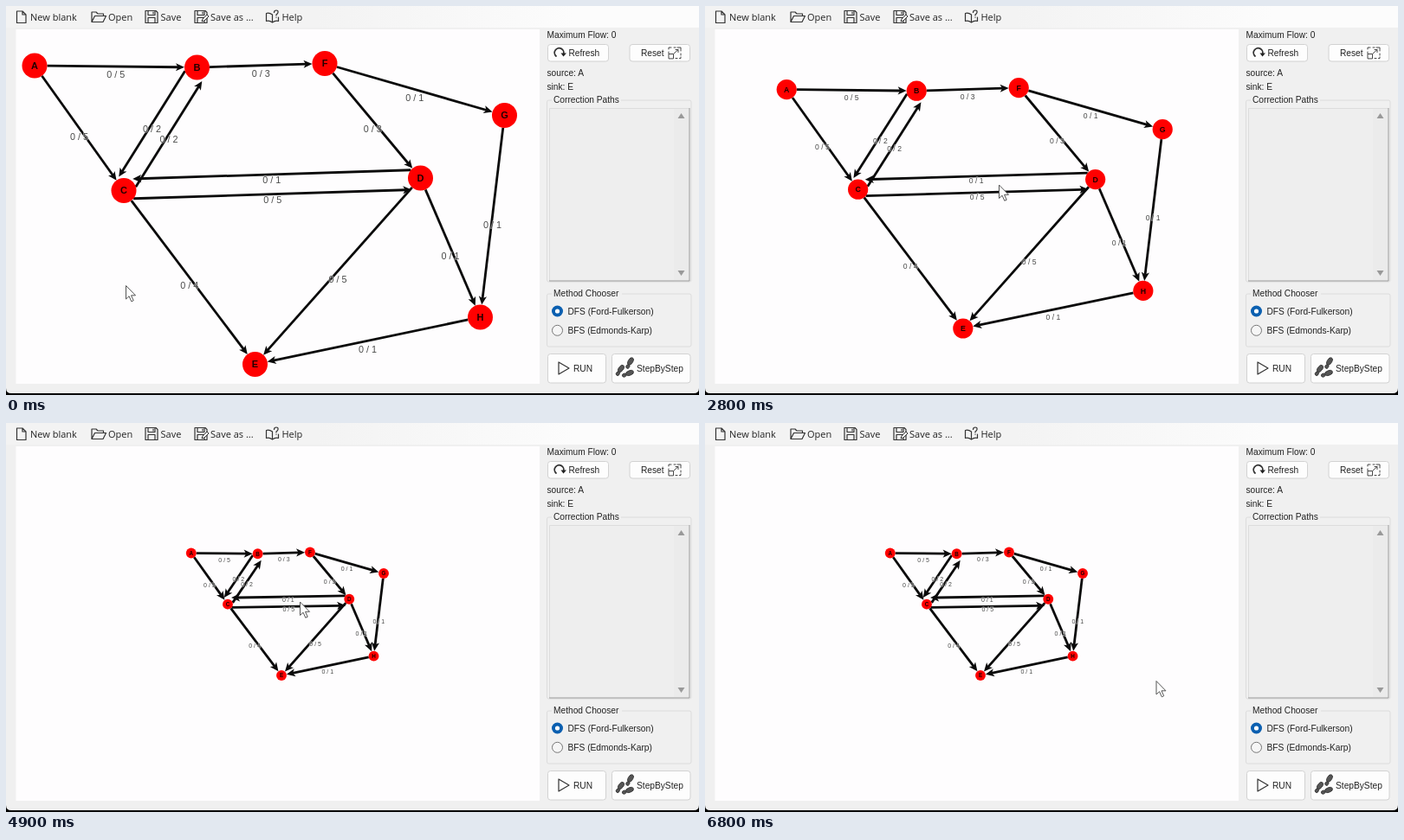
Animation of 800x450 px, one loop 8750 ms. Source, as an HTML page:

```html
<!DOCTYPE html>
<html lang="en">
<head>
<meta charset="utf-8">
<title>Maximum flow editor</title>
<style>
  html, body { margin: 0; width: 100%; height: 100%; overflow: hidden; background: #000; }
  svg { display: block; width: 100vw; height: 100vh; }
  text { font-family: "Liberation Sans", Arial, sans-serif; font-size: 10.2px; fill: #222; }
  .menu text { font-family: "Open Sans", "Noto Sans", sans-serif; font-size: 11px; }
  .icon { fill: none; stroke: #333; stroke-width: 1.2; stroke-linejoin: round; stroke-linecap: round; }
  .button { fill: #fdfdfd; stroke: #d2d2d2; }
  .group { fill: none; stroke: #dcdcdc; }
  #edges path { stroke: #0a0a0a; stroke-width: 2.8; fill: none; }
  #edges .head { fill: #0a0a0a; stroke: none; }
  #labels text { fill: #484848; text-anchor: middle; paint-order: stroke; stroke: #fff; stroke-opacity: .5; stroke-width: 1.6px; }
  #nodes circle { fill: #f00; }
  #nodes text { fill: #200; font-weight: bold; text-anchor: middle; }
</style>
</head>
<body>
<svg viewBox="0 0 800 450">
  <defs>
    <linearGradient id="bar">
      <stop offset=".45" stop-color="#f3f3f3"/>
      <stop offset=".82" stop-color="#fcfcfc"/>
    </linearGradient>
    <g id="floppy" class="icon">
      <path d="M1 1H13L15 3V15H1Z"/>
      <path d="M4 1V6H12V1M4 15V9H12V15M10 2.5V4.5"/>
    </g>
    <g id="shoe" fill="#555" stroke="#333" stroke-width=".8">
      <ellipse rx="2.7" ry="4.6"/>
      <ellipse cx=".3" cy="6.8" rx="2" ry="2.4"/>
    </g>
  </defs>

  <path d="M0 0H800V442Q800 448 794 448H6Q0 448 0 442Z" fill="#f0f0f0"/>
  <rect width="800" height="25" fill="url(#bar)"/>
  <rect x="11.5" y="27" width="604.5" height="410" fill="#fefdfe"/>

  <g class="menu">
    <path class="icon" d="M12.500 6H19L23 10V19.500H12.500ZM19 6V10H23"/>
    <text x="28" y="17">New blank</text>
    <path class="icon" d="M99 18.500V7H104L106 9H112.500V11.500M99 18.500L102.500 11.500H115.500L112 18.500Z"/>
    <text x="118" y="17">Open</text>
    <use href="#floppy" x="160" y="4.500"/>
    <text x="178.500" y="17">Save</text>
    <use href="#floppy" x="217" y="4.500"/>
    <path d="M226 18L227 15L232 10L234 12L229 17Z" fill="#f3f3f3" stroke="#333"/>
    <text x="236" y="17">Save as ...</text>
    <g class="icon">
      <path d="M307.500 19Q304 16.500 300.500 17.500V8.500Q304 7.500 307.500 10ZM307.500 19Q311 16.500 314.500 17.500V13"/>
      <path d="M309.500 7.500Q309.500 5 312 5T314 7.500Q313.500 9 312 10V11M312 13V13.200"/>
    </g>
    <text x="318.500" y="17">Help</text>
  </g>

  <text x="624.500" y="37.200">Maximum Flow: 0</text>
  <text x="624.500" y="81">source: A</text>
  <text x="624.500" y="97">sink: E</text>

  <rect class="button" x="625.500" y="44.500" width="70" height="19.500" rx="3"/>
  <path class="icon" style="stroke-width:1.800" d="M635 58A5.300 5.300 0 1 1 643.500 56"/>
  <path d="M640.500 54.500H647L643.500 58.500Z" fill="#222"/>
  <text x="649.500" y="57.700">Refresh</text>

  <rect class="button" x="720" y="44.500" width="69.500" height="19.500" rx="3"/>
  <text x="733" y="57.700">Reset</text>
  <path class="icon" style="stroke-width:.9" d="M765 50V48H768M771 48H773M775 48H779V52M779 55V57M765 53V55M765 60.500V55.500H770.500V60.500ZM771 55L776 50.500M773 50.500H776V53.500M773 60.500H775M779 59V60.500H777.500"/>

  <rect class="group" x="624.500" y="109" width="166.500" height="210" rx="2"/>
  <rect x="630" y="104" width="80" height="10" fill="#f0f0f0"/>
  <text x="632" y="112">Correction Paths</text>
  <rect x="627" y="118" width="162" height="200" fill="#eee"/>
  <rect x="771" y="119" width="17" height="198" fill="#ebebeb"/>
  <path d="M627.500 318V118.500H789" fill="none" stroke="#ddd"/>
  <path d="M627 318H789V118" fill="none" stroke="#999"/>
  <path d="M775.500 130L779.500 124L783.500 130ZM775.500 306L779.500 312L783.500 306Z" fill="#999"/>

  <rect class="group" x="624.500" y="333" width="166.500" height="61" rx="2"/>
  <rect x="630" y="327" width="81" height="12" fill="#f0f0f0"/>
  <text x="632" y="336">Method Chooser</text>
  <circle cx="636.500" cy="353" r="6.500" fill="#0a5fb0"/>
  <circle cx="636.500" cy="353" r="2.600" fill="#fff"/>
  <text x="648.500" y="356.700">DFS (Ford-Fulkerson)</text>
  <circle cx="636.500" cy="375.300" r="6" fill="#f6f6f6" stroke="#777"/>
  <text x="648.500" y="379.200">BFS (Edmonds-Karp)</text>

  <rect class="button" x="625.500" y="402.500" width="67" height="33.500" rx="3"/>
  <path class="icon" d="M638 412V426L650 419Z"/>
  <text x="655" y="422.800">RUN</text>
  <rect class="button" x="699.500" y="402.500" width="90.500" height="33.500" rx="3"/>
  <use href="#shoe" transform="translate(721 411) rotate(30)"/>
  <use href="#shoe" transform="translate(710 419.500) rotate(35)"/>
  <use href="#shoe" transform="translate(720 424.500) rotate(70)"/>
  <text x="728" y="422.800">StepByStep</text>

  <g id="edges"></g>
  <g id="labels"></g>
  <g id="nodes"></g>
  <path id="cursor" d="M0 0V15.500L3.600 12.200L6.300 18.300L8.700 17.200L6 11.300H11Z" fill="#fff" stroke="#555" stroke-linejoin="round"/>
</svg>
<script>
const LOOP = 8750, TICK = 50;
const RADIUS = 14.5, ZOOM = 0.8;
// Opposite edges run side by side; their arrow tips lean outwards a little.
const LANE = 9.7, LEAN = 3.4;
const ZOOM_TIMES = [2500, 2850, 3900, 4900];
const FOCUS = [339.2, 207];

const NODES = {
  A: [33, 69], B: [220.5, 71], C: [136, 213.5], D: [478.5, 199],
  E: [287.5, 414.5], F: [368, 66.5], G: [575.5, 126.5], H: [547.5, 360]
};
// from, to, capacity
const EDGES = ["AB5", "AC5", "BC2", "CB2", "BF3", "FG1", "FD3", "DC1", "CD5",
  "GH1", "DH1", "DE5", "CE4", "HE1"];
// time, x, y
const CURSOR_PATH = [
  [0, 138.5, 323.5], [900, 235, 279], [1150, 273.5, 260.5], [1600, 318, 227],
  [1950, 339.5, 207], [6100, 339.5, 207], [6250, 375, 224], [6500, 493, 285],
  [6650, 521, 298.5], [LOOP, 521, 298.5]
];

const byId = id => document.getElementById(id);

function add(parent, tag, className, content) {
  const el = document.createElementNS("http://www.w3.org/2000/svg", tag);
  if (className) el.setAttribute("class", className);
  if (content) el.textContent = content;
  return parent.appendChild(el);
}

function set(el, attrs) {
  for (const name in attrs) el.setAttribute(name, attrs[name]);
}

const edges = EDGES.map(([from, to, capacity]) => ({
  from, to,
  paired: EDGES.some(e => e.startsWith(to + from)),
  line: add(byId("edges"), "path"),
  head: add(byId("edges"), "path", "head"),
  label: add(byId("labels"), "text", "", `0 / ${capacity}`)
}));

const nodes = Object.keys(NODES).map(name => ({
  name,
  disc: add(byId("nodes"), "circle"),
  letter: add(byId("nodes"), "text", "", name)
}));

function drawGraph(scale) {
  const place = name => NODES[name].map((v, i) => FOCUS[i] + (v - FOCUS[i]) * scale);
  const radius = RADIUS * scale;
  const labelSize = Math.max(7, 10.8 * scale);
  const letterSize = Math.max(6.3, 11 * scale);

  for (const { from, to, paired, line, head, label } of edges) {
    const [x1, y1] = place(from), [x2, y2] = place(to);
    const length = Math.hypot(x2 - x1, y2 - y1);
    const dx = (x2 - x1) / length, dy = (y2 - y1) / length;
    const lane = paired ? LANE * scale : 0;
    const lean = paired ? LEAN : 0;
    const gap = Math.sqrt(radius * radius - lane * lane);
    const point = (along, side) => [x1 + dx * along - dy * side, y1 + dy * along + dx * side];

    const start = point(gap, lane);
    const tip = point(length - gap, lane + lean);
    const angle = Math.atan2(tip[1] - start[1], tip[0] - start[0]);
    const neck = [tip[0] - 7 * Math.cos(angle), tip[1] - 7 * Math.sin(angle)];
    set(line, { d: `M${start}L${neck}` });
    set(head, {
      d: "M0 0L-10 -4.600L-7.500 0L-10 4.600Z",
      transform: `translate(${tip}) rotate(${angle * 180 / Math.PI})`
    });

    const [x, y] = point(length / 2, lane + lean / 2);
    const drop = paired ? 1.5 + 4.5 * scale : 5.5 + 4 * scale;
    set(label, { x, y: y + drop + labelSize * 0.36, style: `font-size:${labelSize}px` });
  }

  for (const { name, disc, letter } of nodes) {
    const [x, y] = place(name);
    set(disc, { cx: x, cy: y, r: radius });
    set(letter, { x, y: y + letterSize * 0.36, style: `font-size:${letterSize}px` });
  }
}

function cursorAt(t) {
  const i = CURSOR_PATH.findIndex(key => key[0] > t);
  const [t0, x0, y0] = CURSOR_PATH[i - 1], [t1, x1, y1] = CURSOR_PATH[i];
  const k = (t - t0) / (t1 - t0);
  return [x0 + (x1 - x0) * k, y0 + (y1 - y0) * k];
}

function render(time) {
  const t = Math.floor((time % LOOP) / TICK) * TICK;
  drawGraph(ZOOM ** ZOOM_TIMES.filter(z => z <= t).length);
  set(byId("cursor"), { transform: `translate(${cursorAt(t)})` });
}

const startTime = performance.now();
function loop() {
  render(performance.now() - startTime);
  requestAnimationFrame(loop);
}
loop();
</script>
</body>
</html>
```
